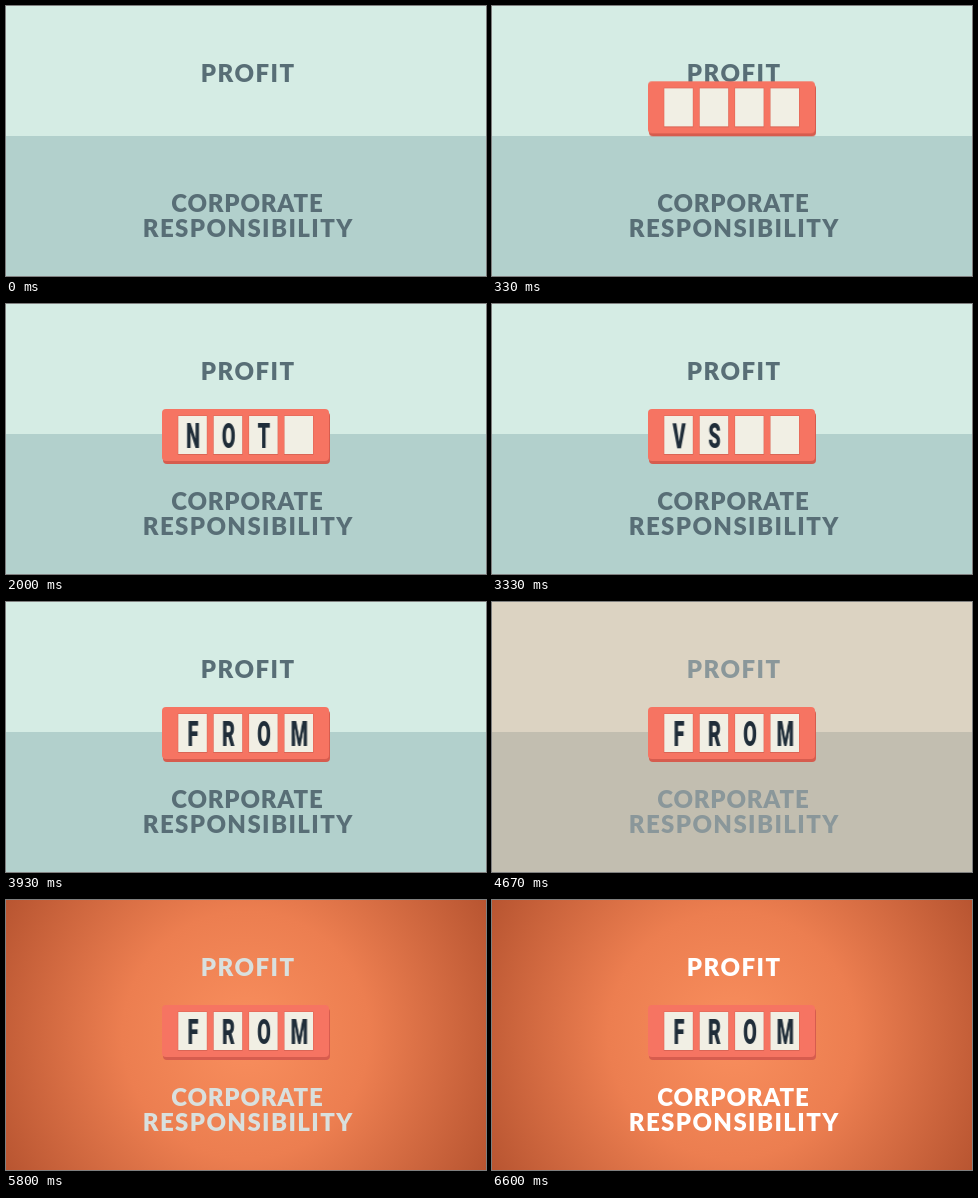
Write an HTML page that moves like this. It is 480 px wide and 270 px high and loops after 6670 ms.

```html
<!DOCTYPE html>
<html lang="en">
<head>
<meta charset="utf-8">
<title>Profit and corporate responsibility</title>
<style>
  html, body { margin: 0; width: 100%; height: 100%; overflow: hidden; background: #d5ece4; }
  svg { display: block; width: 100vw; height: 100vh; }

  .warm, .glow, .titles, .box, .reel { animation: 6670ms linear infinite both; }
  .warm { animation-name: warm; }
  .glow { animation-name: glow; }
  .titles {
    animation-name: titles;
    font: 900 24px Lato, sans-serif;
    text-anchor: middle;
  }
  .box { animation-name: drop; }
  .reel { animation-name: roll; }
  .reel text {
    font: 900 35px Roboto, sans-serif;
    text-anchor: middle;
    fill: #1f2d39;
  }

  @keyframes warm {
    0%, 65.5% { opacity: 0; }
    83.5%, 100% { opacity: 1; }
  }
  @keyframes glow {
    0%, 78% { opacity: 0; }
    79.9% { opacity: .1; }
    84.4%, 100% { opacity: 1; }
  }
  @keyframes titles {
    0%, 64.5% { fill: #586e76; }
    70% { fill: #8a979a; }
    79.9% { fill: #bcc8c5; }
    96%, 100% { fill: #fff; }
  }
  @keyframes drop {
    0%, 2.25% { transform: translateY(-165px); animation-timing-function: cubic-bezier(.3, .3, .5, 1); }
    7.05% { transform: translateY(7px); animation-timing-function: ease-in-out; }
    9.3% { transform: translateY(-2px); animation-timing-function: ease-in-out; }
    11.4%, 100% { transform: none; }
  }
  /* One 40px step per word */
  @keyframes roll {
    0%, 6.45% { transform: translateY(0); animation-timing-function: ease-in-out; }
    12.4%, 18.3% { transform: translateY(40px); animation-timing-function: ease-in-out; }
    26.7%, 35.4% { transform: translateY(80px); animation-timing-function: ease-in-out; }
    42.4%, 49.5% { transform: translateY(120px); animation-timing-function: ease-in-out; }
    56.8%, 100% { transform: translateY(160px); }
  }
</style>
</head>
<body>
<svg viewBox="0 0 480 270">
  <defs>
    <radialGradient id="shade" gradientUnits="userSpaceOnUse" cx="240" cy="135" r="275">
      <stop offset="0" stop-color="#f98f5e"/>
      <stop offset=".45" stop-color="#ec7e50"/>
      <stop offset="1" stop-color="#b85531"/>
    </radialGradient>
    <clipPath id="slot"><rect width="28.5" height="38"/></clipPath>
  </defs>

  <rect width="480" height="270" fill="#d5ece4"/>
  <rect y="130" width="480" height="140" fill="#b2d0cc"/>
  <rect class="warm" width="480" height="270" fill="#ee875d"/>
  <rect class="glow" width="480" height="270" fill="url(#shade)"/>

  <g class="titles">
    <text x="242.2" y="76" letter-spacing="1.5">PROFIT</text>
    <text x="241.4" y="206" letter-spacing=".8">CORPORATE</text>
    <text x="242.2" y="230.5" letter-spacing="1.4">RESPONSIBILITY</text>
  </g>

  <g class="box">
    <rect x="157" y="108" width="167" height="52" rx="4" fill="#d65c4e"/>
    <rect x="156" y="105" width="167" height="52" rx="4" fill="#f67462"/>
    <g id="tiles"></g>
  </g>
</svg>
<script>
  const words = ['AND', 'NOT', 'VS', 'FROM'];

  const letter = (char, step) =>
    `<text transform="translate(14.8 ${32 - 40 * step}) scale(.57 1)">${char}</text>`;

  const tile = i => {
    const letters = words.map((word, w) => word[i] ? letter(word[i], w + 1) : '').join('');
    return `<g transform="translate(${172.3 + 35.4 * i} 112)">
      <rect x="-.5" y="-.5" width="29.5" height="39.5" fill="#c95c4e" opacity=".6"/>
      <rect width="28.5" height="38" fill="#f1efe4"/>
      <g clip-path="url(#slot)">
        <g class="reel" style="animation-delay:${50 * i}ms">${letters}</g>
      </g>
    </g>`;
  };

  document.getElementById('tiles').innerHTML = [0, 1, 2, 3].map(tile).join('');
</script>
</body>
</html>
```
